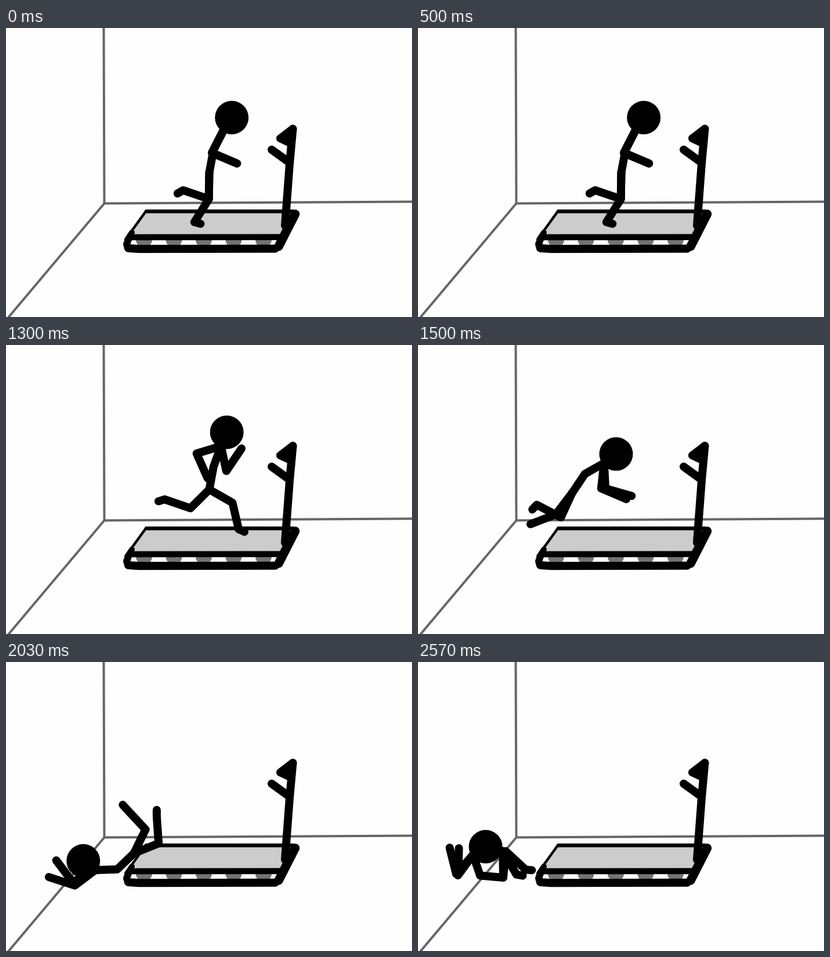
An HTML page with a canvas for the animation above (2630 ms loop, 700 px wide and 500 px high).

```html
<!DOCTYPE html>
<html lang="en">
<head>
<meta charset="utf-8">
<title>Treadmill</title>
<style>
  html, body { margin: 0; width: 100%; height: 100%; overflow: hidden; background: #fefefe; }
  canvas { display: block; }
</style>
</head>
<body>
<canvas id="stage" width="700" height="500"></canvas>
<script>
const ctx = document.getElementById('stage').getContext('2d');
const LOOP = 2630, STEP = 200 / 3, FIRST_HOLD = 30;
const INK = '#000', WALL = '#666', ROLLER = '#737373', BELT = '#ccc', PAPER = '#fefefe';

const SPINE = [40, 38, 26], ARM = [44, 47], LEG = [46, 47, 11];
const LIMB = 14, HEAD_RADIUS = 29;
const STRIDE_STEPS = 7, FALL_START = 21;

// Poses hold the hip position and absolute bone angles in degrees, clockwise from the right.
const wave = (phase, mean, cos, sin, square) =>
  mean + cos * Math.cos(phase) + sin * Math.sin(phase) + square * Math.sin(phase) ** 2;

function runLeg(phase) {
  const thigh = wave(phase, 91, 0, 54, -9);
  const shin = thigh + wave(phase, 69.5, -38.5, 17.5, -14.7);
  return [thigh, shin, shin + wave(phase, -78.5, -28.5, 14.7, 36)];
}

function runArm(phase) {
  const upper = wave(phase, 117, 0, -43.6, 3.7);
  return [upper, upper + wave(phase, -94, 0, -19, -22.6)];
}

function runPose(step) {
  const phase = 2 * Math.PI * step / STRIDE_STEPS;
  const sides = [phase, phase + Math.PI];
  return {
    hip: [350.5, 250],
    spine: [-79.5, wave(phase, -63, 0, 0, -7.5), wave(phase, -57, 0, 0, -11)],
    arms: sides.map(runArm),
    legs: sides.map(runLeg)
  };
}

const dive = {
  hip: [108, 268], spine: [-13, 32, 0],
  arms: [[58, 24], [31, 3]], legs: [[194, 227, -90], [158, 223, 104]]
};
const flip = {
  hip: [220.5, 331], spine: [136, 178, 218],
  arms: [[152, -127], [143, -162]], legs: [[296, 227, -132], [338, 266, 270]]
};
const rest = {
  hip: [147, 373], spine: [185, 251, 327],
  arms: [[131, -104], [126, -88]], legs: [[269, 420, 10], [275, 403, 365]]
};

// Each move eases out towards its pose; a higher power brakes harder.
const moves = [
  { from: runPose(FALL_START), to: dive, start: FALL_START, end: 25, power: 1.5 },
  { from: dive, to: flip, start: 25, end: 30, power: 1 },
  { from: flip, to: rest, start: 30, end: 38, power: 2.5 }
];

function mix(a, b, u) {
  if (typeof a === 'number') return a + (b - a) * u;
  if (Array.isArray(a)) return a.map((value, i) => mix(value, b[i], u));
  return Object.fromEntries(Object.keys(a).map(key => [key, mix(a[key], b[key], u)]));
}

function poseAt(step) {
  if (step < FALL_START) return runPose(step);
  const { from, to, start, end, power } = moves.find(move => step <= move.end);
  return mix(from, to, 1 - (1 - (step - start) / (end - start)) ** power);
}

function line(color, width, points, closed) {
  ctx.beginPath();
  for (let i = 0; i < points.length; i += 2) ctx.lineTo(points[i], points[i + 1]);
  if (closed) ctx.closePath();
  ctx.strokeStyle = ctx.fillStyle = color;
  ctx.lineWidth = width;
  ctx.stroke();
  if (closed) ctx.fill();
}

function disc(color, x, y, r) {
  ctx.beginPath();
  ctx.arc(x, y, r, 0, 2 * Math.PI);
  ctx.fillStyle = color;
  ctx.fill();
}

function drawRoom() {
  ctx.fillStyle = PAPER;
  ctx.fillRect(0, 0, 700, 500);
  line(WALL, 4, [168.5, -4, 169.5, 303.5, 704, 300.5]);
  line(WALL, 4, [169.5, 303.5, 3, 502]);
}

function drawTreadmill() {
  line(PAPER, 4, [216, 366, 468, 366, 466, 376, 214, 376], true);
  for (let i = 0; i < 5; i++) disc(ROLLER, 238 + 51.5 * i, 366, 14);
  line(BELT, 10, [244, 322, 486, 322, 472, 352, 225, 352], true);
  line(INK, 6.5, [242, 317.2, 495, 317.2]);
  line(INK, 4.5, [240.5, 318, 216, 352]);
  line(INK, 10, [217, 354, 209, 366]);
  line(INK, 10.5, [213, 362, 476, 361.7]);
  line(INK, 12, [211, 366, 208, 374, 210, 381]);
  line(INK, 14, [211, 381, 230, 382.3, 464, 381.7]);
  line(INK, 15.5, [498.5, 322, 470, 378]);
  line(INK, LIMB, [481, 342, 489, 235, 494.5, 174.5]);
  line(INK, LIMB, [458, 210.5, 489, 233]);
  line(INK, LIMB, [494.5, 174.5, 473, 191, 490, 199], true);
}

function chain([x, y], lengths, angles) {
  const joints = [[x, y]];
  lengths.forEach((length, i) => {
    const angle = angles[i] * Math.PI / 180;
    x += length * Math.cos(angle);
    y += length * Math.sin(angle);
    joints.push([x, y]);
  });
  line(INK, LIMB, joints.flat());
  return joints;
}

function drawRunner({ hip, spine, arms, legs }) {
  const [, , neck, head] = chain(hip, SPINE, spine);
  for (const arm of arms) chain(neck, ARM, arm);
  for (const leg of legs) chain(hip, LEG, leg);
  disc(INK, ...head, HEAD_RADIUS);
}

const start = performance.now();
function draw() {
  const time = (performance.now() - start) % LOOP;
  const step = Math.max(0, Math.floor((time - FIRST_HOLD) / STEP + 0.001));
  ctx.lineCap = ctx.lineJoin = 'round';
  drawRoom();
  drawTreadmill();
  drawRunner(poseAt(step));
  requestAnimationFrame(draw);
}
draw();
</script>
</body>
</html>
```
